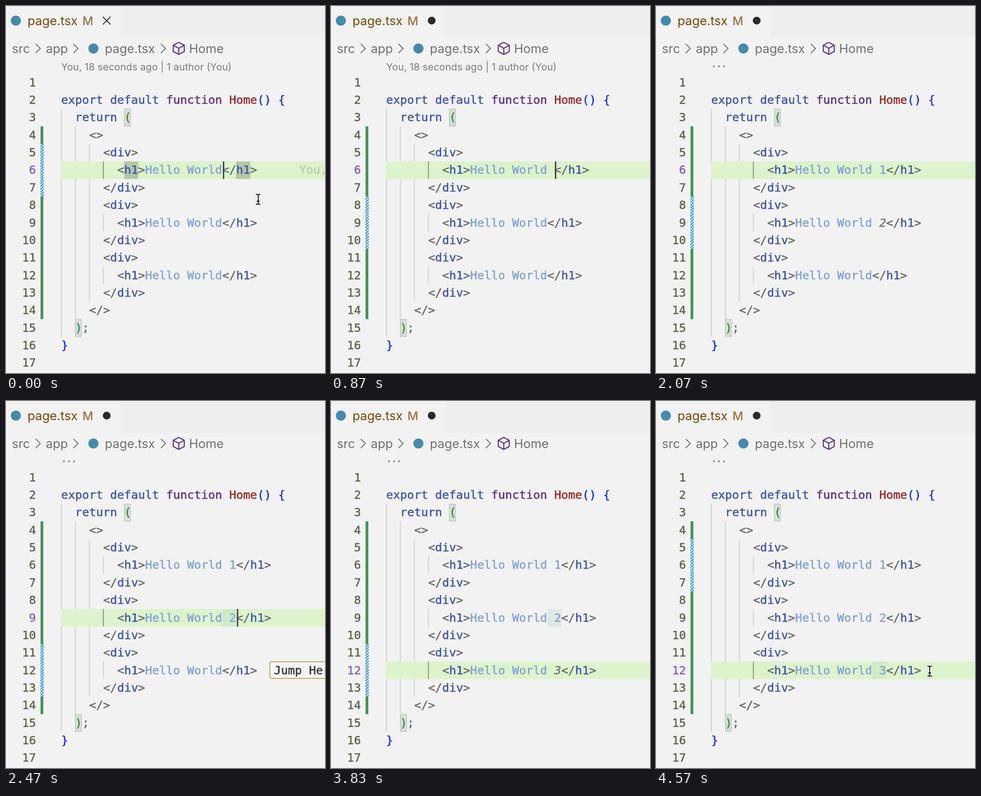
An HTML page with a canvas that plays this animation: 697 by 803 pixels, repeating every 4610 ms.

```html
<!DOCTYPE html>
<html lang="en">
<head>
<meta charset="utf-8">
<title>Editor</title>
<style>
html, body { margin: 0; width: 100%; height: 100%; overflow: hidden; background: #f2f2f2; }
canvas { display: block; }
</style>
</head>
<body>
<canvas id="stage" width="697" height="803"></canvas>
<script>
const ctx = document.getElementById('stage').getContext('2d');
const LOOP = 4610;
const LEFT = 120.5, CHAR = 15.3, TOP = 148.3, ROW = 38.35, BASELINE = 27.4;
const MONO = '25.4px "DejaVu Sans Mono", monospace';
const UI = '27px Inter, sans-serif';
const C = {
  bg: '#f2f2f2', key: '#3c53b1', func: '#5c2d86', name: '#992525', blue: '#0b32f5',
  green: '#2f8f35', punct: '#696969', text: '#7fa1d9', num: '#5f6247', active: '#8259c9',
  row: '#dcf3cb', bar: '#419252', hatch: '#2292d2', crumb: '#707070', logo: '#438bac'
};

// Moments of the edits, in ms
const AT = { space: 600, space2: 780, one: 1300, ghost2: 1700, two: 2250, jump: 2900, three: 4000, mouse: 4330 };

const colX = col => LEFT + col * CHAR;
const rowY = row => TOP + (row - 1) * ROW;

function rect(x, y, w, h, color) {
  ctx.fillStyle = color;
  ctx.fillRect(x, y, w, h);
}

function text(str, x, y, color, font, align = 'left') {
  ctx.font = font;
  ctx.fillStyle = color;
  ctx.textAlign = align;
  ctx.fillText(str, x, y);
}

// Monospace text with a fine outline, which gives it a medium weight
function mono(str, x, row, color, { style = '', align = 'left' } = {}) {
  const y = rowY(row) + BASELINE;
  text(str, x, y, color, style + MONO, align);
  ctx.strokeStyle = color;
  ctx.lineWidth = 0.5;
  ctx.strokeText(str, x, y);
}

function disc(x, y, r, color) {
  ctx.fillStyle = color;
  ctx.beginPath();
  ctx.arc(x, y, r, 0, Math.PI * 2);
  ctx.fill();
}

function line(points, color, width) {
  ctx.strokeStyle = color;
  ctx.lineWidth = width;
  ctx.beginPath();
  points.forEach(([x, y]) => ctx.lineTo(x, y));
  ctx.stroke();
}

function code(row, col, ...tokens) {
  for (const [str, color, style] of tokens) {
    mono(str, colX(col), row, color, { style });
    col += str.length;
  }
}

const cells = (row, col, count, color) => rect(colX(col), rowY(row), count * CHAR, ROW, color);

function header(dirty, shortLens) {
  rect(250, 0, 447, 70, '#eeeeee');
  disc(21.5, 32, 11, C.logo);
  text('page.tsx', 47, 42, '#7a4607', UI);
  text('M', 167, 42, '#9c7443', '500 26px Inter, sans-serif');
  if (dirty) disc(220, 32, 8.5, '#2b2b2b');
  else {
    line([[211.5, 23.5], [228.5, 40.5]], '#333333', 2.2);
    line([[228.5, 23.5], [211.5, 40.5]], '#333333', 2.2);
  }

  text('src', 13, 102.5, C.crumb, UI);
  text('app', 87, 102.5, C.crumb, UI);
  text('page.tsx', 216, 102.5, C.crumb, UI);
  text('Home', 400, 102.5, C.crumb, UI);
  disc(191, 93, 11, C.logo);
  for (const x of [65, 147.5, 338.5]) line([[x, 83], [x + 10, 93], [x, 103]], C.crumb, 2);
  line([[377.5, 79.5], [389.5, 86], [389.5, 99.5], [377.5, 106], [365.5, 99.5],
    [365.5, 86], [377.5, 79.5]], '#5b2b8c', 2.3);
  line([[365.5, 86], [377.5, 92.5], [389.5, 86]], '#5b2b8c', 2.3);
  line([[377.5, 92.5], [377.5, 106]], '#5b2b8c', 2.3);

  if (shortLens) [126.5, 137.5, 148.5].forEach(x => disc(x, 132, 1.9, '#777777'));
  else text('You, 18 seconds ago | 1 author (You)', 120.5, 140.5, '#7c7c7c', '21.7px Inter, sans-serif');
}

function gutter(activeRow, hatchRow) {
  for (let n = 1; n <= 17; n++) {
    mono(n, 65.5, n, n === activeRow ? C.active : C.num, { align: 'right' });
  }
  rect(75.5, rowY(4), 6, ROW * 11, C.bar);

  const y = rowY(hatchRow), h = ROW * 3;
  ctx.save();
  ctx.beginPath();
  ctx.rect(75.5, y, 7, h);
  ctx.clip();
  rect(75, y, 8, h, C.bg);
  for (let s = y; s < y + h + 10; s += 6.2) line([[75, s + 1], [84, s - 8]], C.hatch, 2.4);
  ctx.restore();
}

function guides() {
  [[0, 3, 15], [2, 4, 14], [4, 5, 13]].forEach(([col, from, to]) =>
    rect(colX(col) - 0.5, rowY(from), 2, (to - from + 1) * ROW, '#d0d0d0'));
  for (const row of [6, 9, 12]) rect(colX(6) - 0.5, rowY(row), 2, ROW, '#d0d0d0');
}

function activeLine(row) {
  rect(120, rowY(row), 577, ROW, C.row);
  rect(colX(6) - 0.5, rowY(row), 2, ROW, '#8d8d8d');
}

function bracketBox(row, col) {
  cells(row, col, 0.9, '#d9dfd8');
  ctx.strokeStyle = '#b0b3b0';
  ctx.lineWidth = 1;
  ctx.strokeRect(colX(col) + 0.5, rowY(row) + 0.5, CHAR - 2, ROW - 1);
}

function source(endings) {
  bracketBox(3, 9);
  bracketBox(15, 2);
  code(2, 0, ['export default ', C.key], ['function ', C.func], ['Home', C.name], ['() {', C.blue]);
  code(3, 2, ['return ', C.key], ['(', C.green]);
  code(4, 4, ['<>', C.punct]);
  endings.forEach(([str, ghost], i) => {
    const row = 5 + i * 3;
    code(row, 6, ['<', C.punct], ['div', C.key], ['>', C.punct]);
    code(row + 1, 8, ['<', C.punct], ['h1', C.key], ['>', C.punct], ['Hello World', C.text],
      [str, ghost ? '#757575' : C.text, ghost ? 'italic ' : ''],
      ['</', C.punct], ['h1', C.key], ['>', C.punct]);
    code(row + 2, 6, ['</', C.punct], ['div', C.key], ['>', C.punct]);
  });
  code(14, 4, ['</>', C.punct]);
  code(15, 2, [')', C.green], [';', C.punct]);
  code(16, 0, ['}', C.blue]);
}

function jumpLabel() {
  ctx.beginPath();
  ctx.roundRect(576.5, 570.5, 155, 36.5, 4);
  ctx.fillStyle = '#f4f4f4';
  ctx.fill();
  ctx.strokeStyle = '#b88a26';
  ctx.lineWidth = 1.5;
  ctx.stroke();
  mono('Jump Here', 585.5, 12, '#333333');
}

function mouse(x, y) {
  for (const [color, width] of [['#ffffff', 4.5], ['#111111', 2]]) {
    for (const side of [-1, 1]) {
      line([[x + 5 * side, y - 11], [x + 2 * side, y - 11], [x, y - 9],
        [x, y + 9], [x + 2 * side, y + 11], [x + 5 * side, y + 11]], color, width);
    }
    line([[x - 3, y + 4], [x + 3, y + 4]], color, width);
  }
}

function caret(t) {
  const stops = [[0, 6, 23], [AT.space, 6, 24], [AT.one, 6, 25], [AT.two, 9, 25], [AT.jump, 12, 8], [AT.three, 12, 25]];
  const [start, row, col] = stops.filter(s => t >= s[0]).pop();
  const visible = start === 0 || (t - start) % 1000 < 500;
  return { row, col, visible };
}

function draw(t) {
  const after = name => t >= AT[name];
  const cur = caret(t);
  const typed = after('space');
  const hatchRow = after('three') ? 5 : after('two') ? 11 : after('space2') ? 8 : 5;

  rect(0, 0, 697, 803, C.bg);
  header(typed, after('one'));
  guides();
  activeLine(cur.row);
  if (!typed) {
    cells(6, 9, 2, '#b4c7a7');
    cells(6, 25, 2, '#b4c7a7');
    code(6, 34, ['You,', '#b7ccab']);
  }
  if (after('two') && !after('three')) cells(9, 23, 2, after('jump') ? '#dfe9e4' : '#cfebc6');
  if (after('three')) cells(12, 23, 2, '#cfebc6');

  gutter(cur.row, hatchRow);
  source([
    [after('one') ? ' 1' : typed ? ' ' : ''],
    [after('ghost2') ? ' 2' : '', !after('two')],
    [after('jump') ? ' 3' : '', !after('three')]
  ]);
  if (after('two') && !after('jump')) jumpLabel();
  if (cur.visible) rect(colX(cur.col) + 1.5, rowY(cur.row), 3, ROW, '#453c42');
  if (!typed) mouse(551, 423);
  else if (after('mouse')) mouse(598, 591);
}

const begin = performance.now();
function tick() {
  draw((performance.now() - begin) % LOOP);
  requestAnimationFrame(tick);
}
tick();
</script>
</body>
</html>
```
